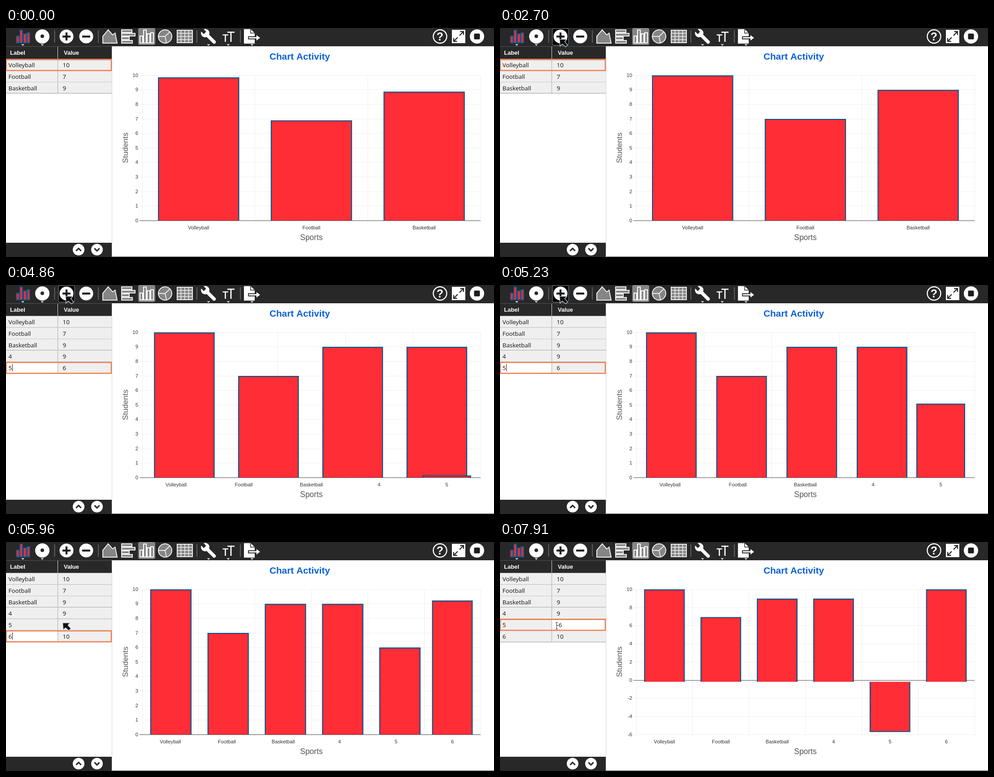
Animation of 1089 by 514 pixels, one loop 8000 ms. Source, as an HTML page with a canvas:

```html
<!DOCTYPE html>
<html lang="en">
<head>
<meta charset="utf-8">
<style>
html, body { margin: 0; width: 100%; height: 100%; overflow: hidden; background: #fff; }
canvas { display: block; }
</style>
</head>
<body>
<canvas id="stage" width="1089" height="514"></canvas>
<script>
const ctx = document.getElementById('stage').getContext('2d');
const LOOP = 8000, DARK = '#282828', RED = '#ff2d36', BLUE = '#00578c', CORAL = '#f47c4c';
const SANS = '"Liberation Sans", Arial, sans-serif', TABLE = '13.4px "Open Sans", sans-serif';
const LEFT = 304, RIGHT = 1059, TOP = 106.3, BOTTOM = 432.3;

const names = ['Volleyball', 'Football', 'Basketball', '4', '5', '6'];
const phases = [
  { t: -656, values: [10, 7, 9], min: 0, step: 1 },
  { t: 3754, values: [10, 7, 9, 9], min: 0, step: 1 },
  { t: 4855, values: [10, 7, 9, 9, 6], min: 0, step: 1 },
  { t: 5488, values: [10, 7, 9, 9, 6, 10], min: 0, step: 1 },
  { t: 7326, values: [10, 7, 9, 9, -6, 10], min: -6, step: 2 }
];
const CELL_CLICK = 6440, TYPED = 7360;
const pointerPath = [[970, 1089, 514], [1370, 336, 215], [1820, 336, 215], [2620, 133, 25.5],
                     [5490, 133, 25.5], [5590, 136.5, 121], [6030, 126, 186]];

// ---- drawing helpers ----
function rect(x, y, w, h, fill, stroke, lw = 1) {
  if (fill) { ctx.fillStyle = fill; ctx.fillRect(x, y, w, h); }
  if (stroke) { ctx.strokeStyle = stroke; ctx.lineWidth = lw; ctx.strokeRect(x, y, w, h); }
}
function round(x, y, w, h, r, fill, stroke) {
  ctx.beginPath(); ctx.roundRect(x, y, w, h, r); paint(fill, stroke, 1);
}
function paint(fill, stroke, lw) {
  if (fill) { ctx.fillStyle = fill; ctx.fill(); }
  if (stroke) { ctx.strokeStyle = stroke; ctx.lineWidth = lw; ctx.stroke(); }
}
function circle(x, y, r, fill, stroke, lw) {
  ctx.beginPath(); ctx.arc(x, y, r, 0, 7); paint(fill, stroke, lw);
}
function path(points, fill, stroke, lw, closed) {
  ctx.beginPath();
  points.forEach(([x, y]) => ctx.lineTo(x, y));
  if (closed) ctx.closePath();
  paint(fill, stroke, lw);
}
const line = (x1, y1, x2, y2, color, lw = 1) => path([[x1, y1], [x2, y2]], null, color, lw);
function text(s, x, y, font, color, align = 'left') {
  ctx.font = font; ctx.fillStyle = color; ctx.textAlign = align; ctx.fillText(s, x, y);
}
const chevron = (x, y, size, color, lw) =>
  path([[x - Math.abs(size), y - size / 2], [x, y + size / 2], [x + Math.abs(size), y - size / 2]], null, color, lw);

// ---- chart ----
const yOf = (phase, v) => BOTTOM - (v - phase.min) * (BOTTOM - TOP) / (10 - phase.min);

function targetBar(k, i) {
  const p = phases[k], cat = (RIGHT - LEFT) / p.values.length;
  return { x: LEFT + cat * (i + .5), w: cat * .72, y: yOf(p, p.values[i]), base: yOf(p, 0) };
}
// Every update eases from wherever the bar is at that moment.
function barAt(k, i, t) {
  const to = targetBar(k, i);
  const from = k && i < phases[k - 1].values.length ? barAt(k - 1, i, phases[k].t) : { ...to, y: to.base };
  const p = Math.min(1, Math.max(0, (t - phases[k].t) / 1000)), e = 1 - (1 - p) ** 4;
  const bar = {};
  for (const key in to) bar[key] = from[key] + (to[key] - from[key]) * e;
  return bar;
}

function drawChart(k, t) {
  const p = phases[k], n = p.values.length, cat = (RIGHT - LEFT) / n;
  const font = '11.2px ' + SANS;
  text('Chart Activity', 655.5, 71, 'bold 20.8px ' + SANS, '#0b60d8', 'center');
  for (let i = 0; i <= n; i++) {
    const x = Math.floor(LEFT + cat * i) + .5;
    line(x, 106, x, 439, '#eee');
    if (i < n) text(names[i], LEFT + cat * (i + .5), 452, font, '#333', 'center');
  }
  for (let v = p.min; v <= 10; v += p.step) {
    const y = Math.floor(yOf(p, v)) + .5;
    line(298, y, RIGHT, y, v ? '#f0f0f0' : '#4a4a4a');
    text(v, 295, y + 3.6, font, '#333', 'right');
  }
  text('Sports', 681.5, 476, '17.5px ' + SANS, '#555', 'center');
  ctx.save();
  ctx.translate(271.5, 269);
  ctx.rotate(-Math.PI / 2);
  text('Students', 0, 0, '17.4px ' + SANS, '#555', 'center');
  ctx.restore();

  for (let i = 0; i < n; i++) {
    const b = barAt(k, i, t), l = b.x - b.w / 2 + 1, r = b.x + b.w / 2 - 1;
    const y = b.y + Math.sign(b.base - b.y);
    path([[l, b.base], [l, y], [r, y], [r, b.base]], RED, BLUE, 2.2);
  }
}

// ---- table ----
function drawTable(k, t) {
  rect(0, 41, 236, 28.5, DARK);
  line(0, 41.5, 236, 41.5, '#555');
  text('Label', 9, 60, 'bold 13px ' + SANS, '#fff');
  text('Value', 129, 60, 'bold 13px ' + SANS, '#fff');
  line(115.5, 42, 115.5, 69, '#ddd');
  line(236.5, 41, 236.5, 514, '#d5d5d5');

  const values = phases[k].values, editValue = t >= CELL_CLICK;
  const selected = editValue ? 4 : k ? values.length - 1 : 0;
  values.forEach((v, i) => {
    const y = 70 + 25.7 * i, line1 = Math.round(y + 25) + .5;
    const editing = i === selected && k > 0;
    rect(0, y, 115, 25.7, editing && !editValue ? '#fff' : '#efefef');
    rect(116, y, 120, 25.7, editing && editValue ? '#fff' : '#efefef');
    line(0, line1, 236, line1, '#b4b4b4', 1.4);
    line(115.5, y, 115.5, y + 25.7, '#b4b4b4', 1.2);
    text(names[i], 5.5, y + 18.2, TABLE, '#111');
    text(v, 126.5, y + 18.2, TABLE, '#111');
  });

  const y = 70 + 25.7 * selected;
  rect(.5, y + 1, 234.5, 24.4, null, CORAL, 2.5);
  if (k) {
    const typed = t >= TYPED;
    const since = t - (typed ? TYPED : editValue ? CELL_CLICK : phases[k].t);
    const x = typed ? 131.5 : editValue ? 126.5 : 14.5;
    if (since % 1000 < 500) line(x, y + 4.5, x, y + 21, '#111');
  }

  rect(0, 482, 236, 32, DARK);
  [[162, -7], [203, 7]].forEach(([x, size]) => {
    circle(x, 497.5, 13, '#fff');
    chevron(x, 497.5, size * .8, DARK, 3.2);
  });
  rect(237, 513, 852, 1, '#444');
}

// ---- toolbar ----
function barsIcon(x, fill, stroke) {
  [18, 4.5, 13, 10.5].forEach((y, i) => rect(x + 8 * i, y, 6, 33.5 - y, fill, stroke, 2));
}
function drawToolbar(t) {
  rect(0, 0, 1089, 41, DARK);
  [108.5, 206, 426, 523].forEach(x => line(x, 5, x, 33, '#777', 1.4));

  barsIcon(23, RED, BLUE);
  circle(81, 19, 16, '#fff');
  circle(81, 18.5, 4, DARK);

  if (t > 2540 && t < 5620) round(117, 1, 36, 37.5, 3, '#000', '#8a8a8a');
  [135, 179].forEach(x => {
    circle(x, 19, 15.5, '#fff');
    rect(x - 9, 17, 18, 4.4, '#1c1c1c');
  });
  rect(132.8, 10, 4.4, 18, '#1c1c1c');

  const GRAY = '#858585';
  path([[216, 34], [216, 18.5], [228, 4], [238, 15.5], [243.5, 11.5], [248, 34]], GRAY, '#eee', 2, true);
  [23, 30, 17, 24].forEach((w, i) => rect(258, 4 + 8 * i, w, 6, GRAY, '#eee', 2));
  round(295, 0, 38, 38, 4, '#858585');
  barsIcon(299, '#858585', '#fff');
  circle(355, 19, 15, GRAY, '#eee', 2);
  path([[340, 19], [355, 19], [366, 8.5]], null, '#eee', 1.8);
  line(355, 19, 358, 33.5, '#eee', 1.8);
  rect(382, 5, 34, 28, GRAY, '#eee', 2);
  for (let i = 1; i < 4; i++) {
    line(382 + 8.5 * i, 5, 382 + 8.5 * i, 33, '#eee', 1.6);
    line(382, 5 + 7 * i, 416, 5 + 7 * i, '#eee', 1.6);
  }

  ctx.lineCap = 'round';
  line(446, 13, 464.5, 31.5, '#fff', 7.5);
  ctx.lineCap = 'butt';
  circle(444.5, 11.5, 9.5, '#fff');
  line(434, 1, 444, 11, DARK, 7.5);

  line(483.5, 15.5, 496, 15.5, '#fff', 2.4);
  line(489.5, 15.5, 489.5, 31, '#fff', 2.6);
  line(494, 9.5, 510, 9.5, '#fff', 2.6);
  line(502, 9.5, 502, 31, '#fff', 2.8);

  path([[531, 2.5], [546, 2.5], [555, 11.5], [555, 35], [531, 35]], '#fff');
  path([[546, 2.5], [546, 11.5], [555, 11.5]], null, DARK, 1.5);
  path([[541, 19.5], [558, 19.5], [558, 14], [568.5, 22], [558, 30], [558, 24.5], [541, 24.5]],
    '#fff', DARK, 1.8, true);

  [37.5, 81, 452, 496, 549].forEach(x => chevron(x, 37.5, 2.3, '#fff', 1.6));

  circle(968.5, 19, 15, null, '#fff', 2.4);
  text('?', 968.5, 28, 'bold 25px ' + SANS, '#fff', 'center');
  rect(995, 4, 30, 30, '#fff');
  line(1012, 17, 1020, 9, DARK, 2.4);
  path([[1013.5, 8], [1021, 8], [1021, 15.5]], null, DARK, 2.4);
  line(1008, 21, 1000, 29, DARK, 2.4);
  path([[1006.5, 30], [999, 30], [999, 22.5]], null, DARK, 2.4);
  circle(1051, 19, 16, '#fff');
  round(1044.5, 12.5, 13, 13, 2, '#1c1c1c');
}

// ---- pointer ----
function drawPointer(t) {
  if (t < pointerPath[0][0]) return;
  if (t >= CELL_CLICK) {
    line(126.5, 180, 126.5, 195, '#222');
    [180, 195].forEach(y => line(123.5, y + .5, 129.5, y + .5, '#444'));
    return;
  }
  let [, x, y] = pointerPath[pointerPath.length - 1];
  const next = pointerPath.findIndex(key => key[0] > t);
  if (next > 0) {
    const a = pointerPath[next - 1], b = pointerPath[next];
    const p = (t - a[0]) / (b[0] - a[0]), e = p * p * (3 - 2 * p);
    x = a[1] + (b[1] - a[1]) * e;
    y = a[2] + (b[2] - a[2]) * e;
  }
  ctx.save();
  ctx.translate(x, y);
  path([[0, 0], [16, 0], [11.5, 5], [18, 12.5], [13.5, 17], [6, 10.5], [1, 15.5]], '#0a0f14', '#d8d8d8', 1.2, true);
  ctx.restore();
}

function draw(now) {
  const t = now % LOOP;
  const k = phases.findLastIndex(p => t >= p.t);
  rect(0, 0, 1089, 514, '#fff');
  drawChart(k, t);
  drawTable(k, t);
  drawToolbar(t);
  drawPointer(t);
}
const start = performance.now();
function tick() {
  draw(performance.now() - start);
  requestAnimationFrame(tick);
}
tick();
</script>
</body>
</html>
```
